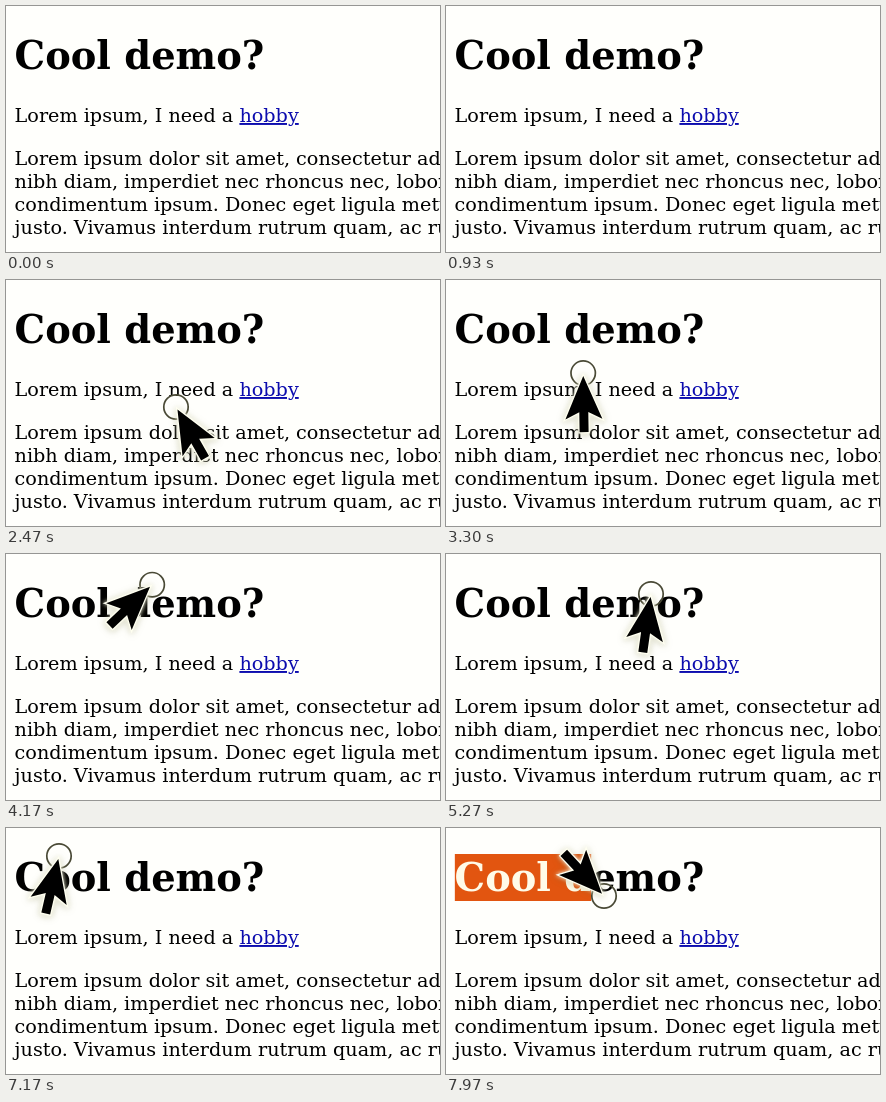
Write an HTML page that moves like this. It is 434x246 px and loops after 8 s.

```html
<!DOCTYPE html>
<html lang="en">
<head>
<meta charset="utf-8">
<title>Cool demo?</title>
<style>
  html, body { margin: 0; width: 100%; height: 100%; overflow: hidden; background: #fffffc; }
  svg { display: block; font: 19.2px "DejaVu Serif", serif; }
  .title { font-size: 38.4px; font-weight: bold; }
  .link { fill: #0c0cae; text-decoration: underline 1px; }
  #arrow { filter: drop-shadow(0 0 2px #fffff0) drop-shadow(0 1px 3px #6464284d); }
</style>
</head>
<body>
<svg width="434" height="246" viewBox="0 0 434 246">
  <defs>
    <clipPath id="selected"><rect id="clip" x="8.6" y="26" width="0" height="47"/></clipPath>
  </defs>
  <text id="title" class="title" x="8.6" y="63">Cool demo?</text>
  <g clip-path="url(#selected)">
    <rect x="8.6" y="26" width="260" height="47" fill="#e25510"/>
    <text class="title" x="8.6" y="63" fill="#fffbe8">Cool demo?</text>
  </g>
  <text x="8.6" y="116">Lorem ipsum, I need a <tspan class="link">hobby</tspan></text>
  <text x="8.6" y="159">Lorem ipsum dolor sit amet, consectetur adipiscing</text>
  <text x="8.6" y="182">nibh diam, imperdiet nec rhoncus nec, lobortis</text>
  <text x="8.6" y="205">condimentum ipsum. Donec eget ligula metus</text>
  <text x="8.6" y="228">justo. Vivamus interdum rutrum quam, ac rutrum</text>
  <g id="pointer">
    <circle r="12.2" fill="none" stroke="#4a4a36" stroke-width="1.7"/>
    <g id="arrow">
      <path id="shape" d="M3 0L46 18.5 39 4.5H59V-4.5H39L46-18.5Z"
            stroke="#fffff0" stroke-width="2.5" paint-order="stroke"/>
    </g>
  </g>
</svg>
<script>
const LOOP = 8000, ENTER = 1480, SPIN = 2470, WIDEST = 4170, WANDER = 5270, PRESS = 7280;
const byId = id => document.getElementById(id);
const title = byId('title'), clip = byId('clip');
const pointer = byId('pointer'), shape = byId('shape');

const mix = (a, b, u) => a.map((v, i) => v + (b[i] - v) * u);
const progress = (t, from, to) => Math.min((t - from) / (to - from), 1);
const easeOut = u => Math.sin(u * Math.PI / 2);
const easeInOut = u => u * u * (3 - 2 * u);

// Poses are x, y, tail direction; orbits are centre x, y, radius, phase, tail direction.
const entry = [300, 275, 0];
const tight = [181, 134, 13, 212, 60];
const wide = [181, 134, 109, 971, 856];
const closing = [170, 113, 81, 1376, 1178];

// Sweeps over the heading, then the selection drag: time and pose.
const sweeps = [
  [WANDER, 205, 40, 1178], [6150, 65, 36, 1180], [6750, 238, 75, 1200],
  [7170, 53, 28, 1183], [PRESS, 21, 45, 1195],
  [7700, 254, 60, 1280], [7970, 158, 68, 1307]
];

function orbit([cx, cy, radius, phase, tail]) {
  const a = phase * Math.PI / 180;
  return [cx + radius * Math.cos(a), cy + radius * Math.sin(a), tail];
}

function pose(t) {
  if (t < SPIN) return mix(entry, orbit(tight), easeOut(progress(t, ENTER, SPIN)));
  if (t < WIDEST) return orbit(mix(tight, wide, progress(t, SPIN, WIDEST)));
  if (t < WANDER) return orbit(mix(wide, closing, progress(t, WIDEST, WANDER)));
  const next = sweeps.findIndex(s => s[0] > t);
  const [a, b] = sweeps.slice(next < 0 ? -2 : next - 1);
  const [to, from] = next < 0 ? sweeps.slice(-2).reverse() : [b, a];
  return mix(from.slice(1), to.slice(1), easeInOut(progress(t, from[0], to[0])));
}

// Selection snaps to the nearest gap between letters.
function selectionWidth(x) {
  let edge = 8.6;
  for (let i = 0; i < title.getNumberOfChars(); i++) {
    const end = title.getEndPositionOfChar(i).x;
    if (x - 1 < (edge + end) / 2) break;
    edge = end;
  }
  return edge - 8.6;
}

function draw(t) {
  pointer.style.display = t < ENTER ? 'none' : '';
  const [x, y, tail] = pose(Math.max(t, ENTER));
  pointer.setAttribute('transform', `translate(${x} ${y})`);
  shape.setAttribute('transform', `rotate(${tail})`);
  clip.setAttribute('width', t < PRESS ? 0 : selectionWidth(x));
}

const start = performance.now();
function frame() {
  draw((performance.now() - start) % LOOP);
  requestAnimationFrame(frame);
}
frame();
</script>
</body>
</html>
```
